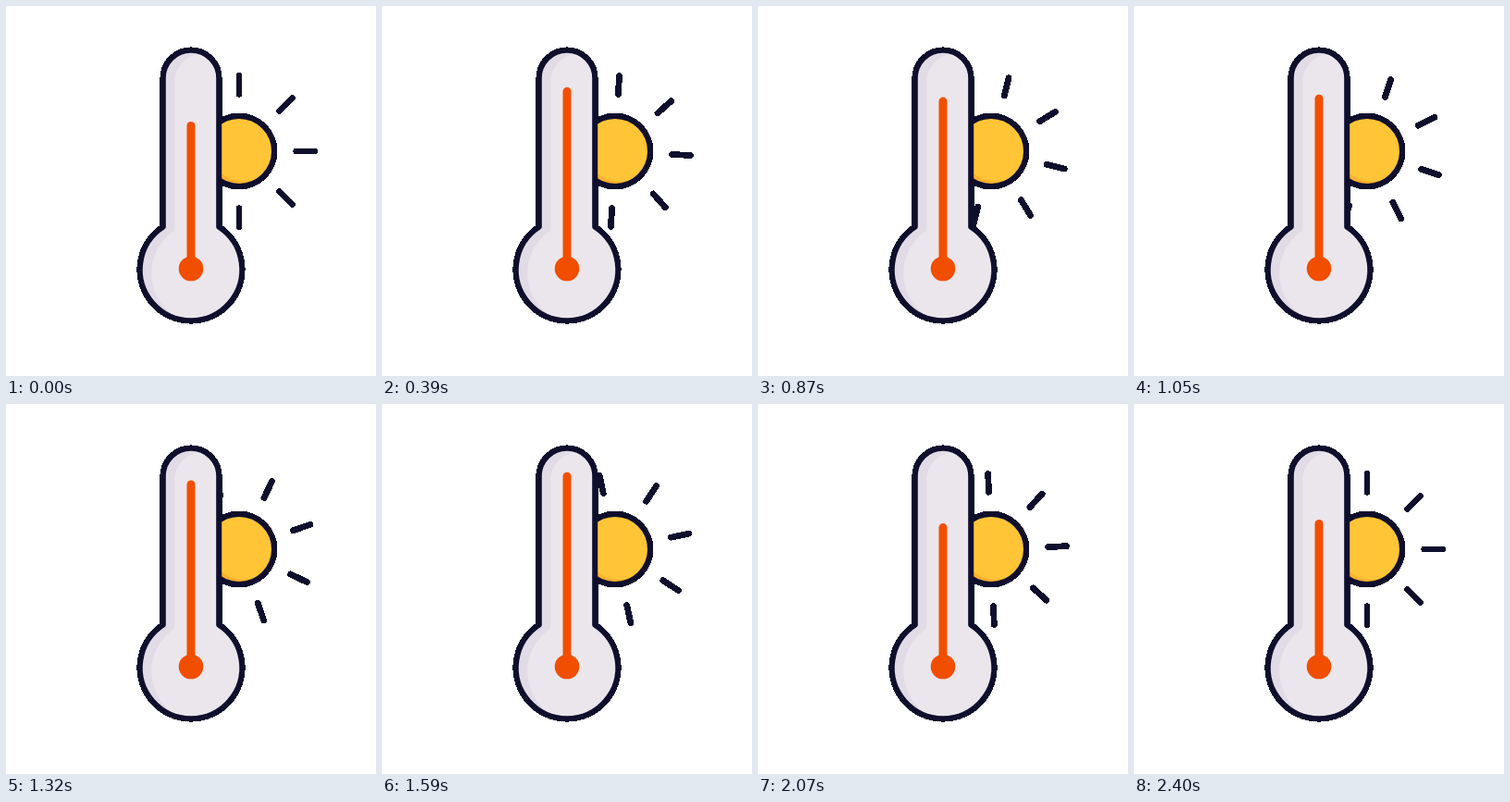
An HTML page for the animation above (4.43 s loop, 400 by 400 pixels).

```html
<!DOCTYPE html>
<html lang="en">
<head>
<meta charset="utf-8">
<title>Thermometer and sun</title>
<style>
  html, body { margin: 0; width: 100%; height: 100%; overflow: hidden; background: #fff; }
  svg { display: block; width: 100%; height: 100%; }
  .line, .rim { fill: none; stroke: #0f0f2d; stroke-width: 6; stroke-linecap: round; stroke-linejoin: round; }
  .rim { stroke-width: 6.8; shape-rendering: crispEdges; }
</style>
</head>
<body>
<svg viewBox="0 0 400 400">
  <defs>
    <path id="body" d="M169.8 238.8V78a30.2 30.2 0 0 1 60.4 0V238.8A55.2 55.2 0 1 1 169.8 238.8Z"/>
    <circle id="disc" cx="252" cy="157" r="38"/>
    <path id="ray" d="M252 95.2V75.5"/>
    <clipPath id="inBody"><use href="#body"/></clipPath>
    <clipPath id="inDisc"><use href="#disc"/></clipPath>
  </defs>
  <!-- hard outer edges, behind the smooth outlines -->
  <g class="rim">
    <g id="rays"></g>
    <use href="#disc"/>
    <use href="#body"/>
  </g>
  <g clip-path="url(#inDisc)">
    <use href="#disc" fill="#ffb02e"/>
    <use href="#disc" x="5" y="-5" fill="#ffc536"/>
  </g>
  <use href="#disc" class="line"/>
  <g clip-path="url(#inBody)">
    <use href="#body" fill="#e1dbe6"/>
    <use href="#body" x="12.5" y="4" fill="#ebe6ec"/>
  </g>
  <use href="#body" class="line"/>
  <path id="mercury" stroke="#f24e00" stroke-width="9" stroke-linecap="round"/>
  <circle cx="200" cy="284" r="13.3" fill="#f24e00"/>
</svg>
<script>
const LOOP = 4430, ACTIVE = 2400, STEP = 30;
const rays = document.getElementById('rays');
const mercury = document.getElementById('mercury');

// [time, height of the mercury's tip]
const levels = [[0, 129.5], [400, 92.3], [900, 103.2], [1600, 78.2], [2050, 133.6], [ACTIVE, 129.5]];

const ease = p => p * p * (3 - 2 * p);

function levelAt(t) {
  const i = Math.max(1, levels.findIndex(k => k[0] >= t));
  const [t0, y0] = levels[i - 1], [t1, y1] = levels[i];
  return y0 + (y1 - y0) * ease((t - t0) / (t1 - t0));
}

for (let a = 0; a < 360; a += 45)
  rays.innerHTML += `<use href="#ray" transform="rotate(${a} 252 157)"/>`;

function draw(now) {
  const t = Math.min(ACTIVE, Math.floor((now % LOOP) / STEP) * STEP);
  rays.setAttribute('transform', `rotate(${45 * ease(t / ACTIVE)} 252 157)`);
  mercury.setAttribute('d', `M200 284V${levelAt(t)}`);
}

const start = performance.now();
function tick() {
  draw(performance.now() - start);
  requestAnimationFrame(tick);
}
tick();
</script>
</body>
</html>
```
